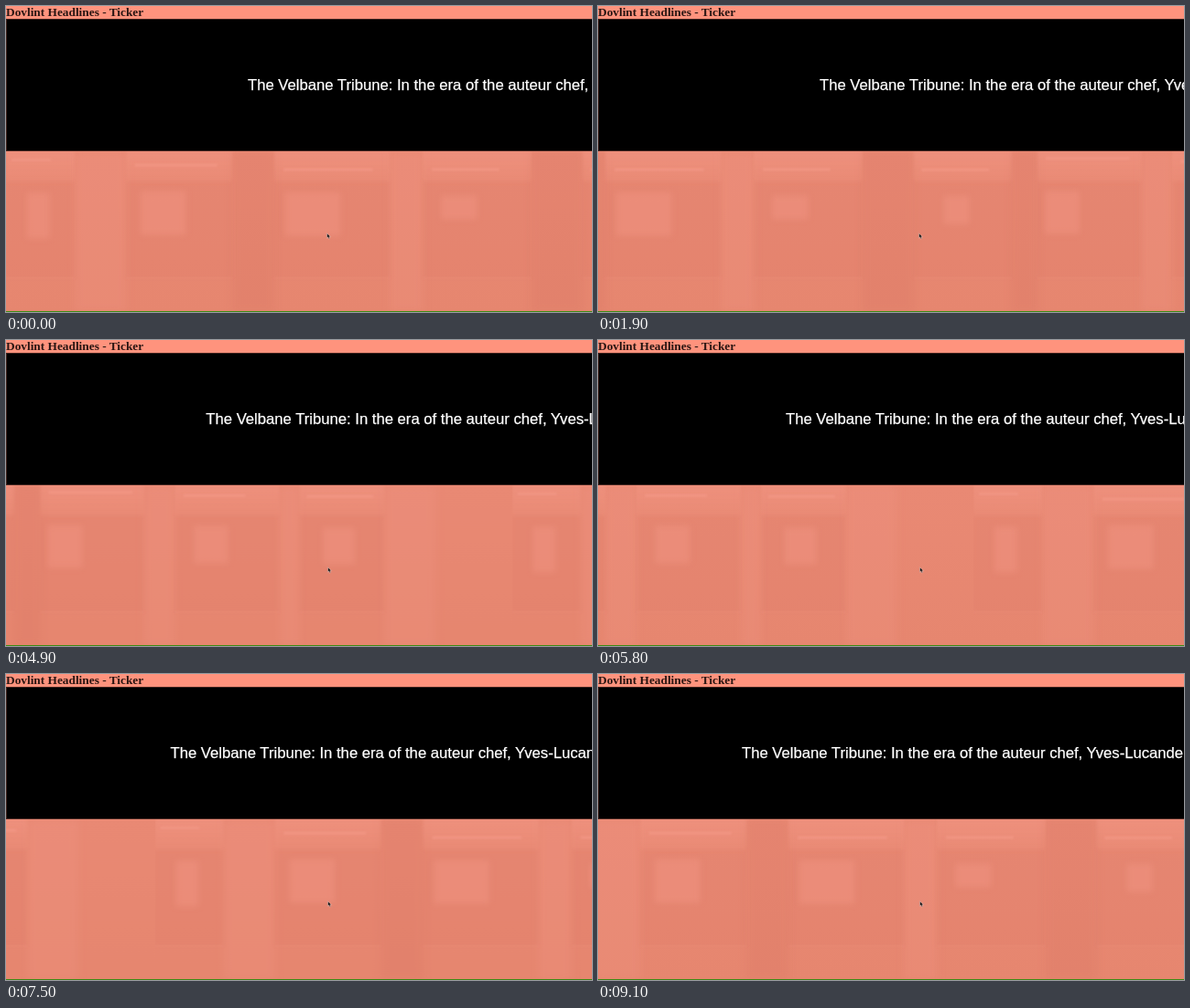
An HTML page with a canvas that plays this animation: 640 by 335 pixels, repeating every 9.2 s.

```html
<!DOCTYPE html>
<html lang="en">
<head>
<meta charset="utf-8">
<title>Headline ticker</title>
<style>
  html, body { margin: 0; width: 100%; height: 100%; overflow: hidden; background: #ff937d; }
  canvas, h1, #band, #line { position: absolute; margin: 0; left: 0; white-space: nowrap; }
  canvas { top: 159px; }
  h1 { top: 0; font: bold 13.33px/13px "Liberation Serif", Times, serif; color: #2a1613; }
  #band { top: 14px; width: 640px; height: 145px; background: #000; overflow: hidden; }
  #band::after { content: ""; position: absolute; inset: 0; border: solid #40231e; border-width: 1px 0 1px 1px; }
  #line { top: 63px; font: 16.67px/20px "Liberation Sans", Helvetica, sans-serif; color: #fff; -webkit-text-stroke: .25px #fff; }
  svg { position: absolute; left: 0; top: 248px; }
</style>
</head>
<body>
<canvas id="view" width="640" height="176"></canvas>
<h1>Dovlint Headlines - Ticker</h1>
<div id="band"><div id="line">The Velbane Tribune: In the era of the auteur chef, Yves-Lucande</div></div>
<svg id="mouse" width="8" height="9"><path d="M1.5 .8V6L2.7 5 3.6 7 4.6 6.5 3.8 4.7H5.4Z" fill="#111" stroke="#f6cfc6" stroke-width=".5"/></svg>
<script>
const LOOP = 9200, STRIP = 1280, HEIGHT = 176, SPEED = 0.15;
const $ = id => document.getElementById(id);
const ctx = $('view').getContext('2d');

// Ticker position: [time, x]
const keys = [[0, 264], [1900, 242], [3800, 233], [5800, 205], [6800, 186], [8200, 172], [9100, 157]];

// The picture updates in quick bursts, then slowly until the next burst
const bursts = [200, 3800, 6100];
const ticks = keys.map(k => k[0]);
bursts.forEach((start, i) => {
  const end = bursts[i + 1] || LOOP;
  for (let t = start; t < end; t += t < start + 1650 ? 150 : 400) ticks.push(t);
});
ticks.sort((a, b) => a - b);

let seed = 7;
function rand(min, max) {
  seed = seed * 16807 % 2147483647;
  return min + (max - min) * seed / 2147483647;
}

const light = a => `rgba(246,156,138,${a})`;
const dark = a => `rgba(212,114,96,${a})`;

function fade(g, height, top, bottom) {
  const fill = g.createLinearGradient(0, 0, 0, height);
  fill.addColorStop(0, top);
  fill.addColorStop(1, bottom);
  return fill;
}

// A blurred train: lit panel, window and lamp streak per bay, with a post between bays
function makeTrain() {
  const canvas = document.createElement('canvas');
  canvas.width = STRIP;
  canvas.height = HEIGHT;
  const g = canvas.getContext('2d');
  const box = (x, y, w, h, fill, blur) => {
    g.filter = `blur(${blur}px)`;
    g.fillStyle = fill;
    g.fillRect(x, y, w, h);
  };
  box(0, 0, STRIP, HEIGHT, fade(g, HEIGHT, '#e98974', '#e6866f'), 0);
  for (let x = 0; x < STRIP - 90;) {
    const w = Math.min(rand(75, 150), STRIP - x - 20);
    const gap = rand(15, 60);
    box(x, 0, w, 34, fade(g, 34, light(.4), light(.08)), 1.5);
    box(x, 34, w, 104, dark(.12), 2);
    box(x + w * .08, rand(3, 20), w * rand(.5, .84), 3, light(.6), 1.2);
    box(x + w * rand(.05, .4), rand(40, 50), w * rand(.25, .5), rand(20, 60), light(.35), 3);
    box(x, 138, w, 2, light(.2), 1);
    box(x + w, 0, gap, HEIGHT, rand(0, 1) < .6 ? dark(.18) : light(.2), 4);
    x += w + gap;
  }
  return canvas;
}

const train = makeTrain();

function draw(t) {
  const shift = -t * SPEED % STRIP;
  ctx.drawImage(train, shift, 0);
  ctx.drawImage(train, shift + STRIP, 0);
  ctx.fillStyle = '#3f8a14';
  ctx.fillRect(0, HEIGHT - 1, 640, 1);

  const i = keys.findLastIndex(k => k[0] <= t);
  const [t0, x0] = keys[i], [t1, x1] = keys[i + 1] || [LOOP, x0];
  const x = x0 + (x1 - x0) * (t - t0) / (t1 - t0);
  $('line').style.transform = `translateX(${x}px)`;
  $('mouse').style.left = (t < 2600 ? 348.5 : 350) + 'px';
}

let shown = -1;
function frame() {
  const now = performance.now() % LOOP;
  const t = ticks.findLast(k => k <= now);
  if (t !== shown) draw(shown = t);
  requestAnimationFrame(frame);
}
frame();
</script>
</body>
</html>
```
